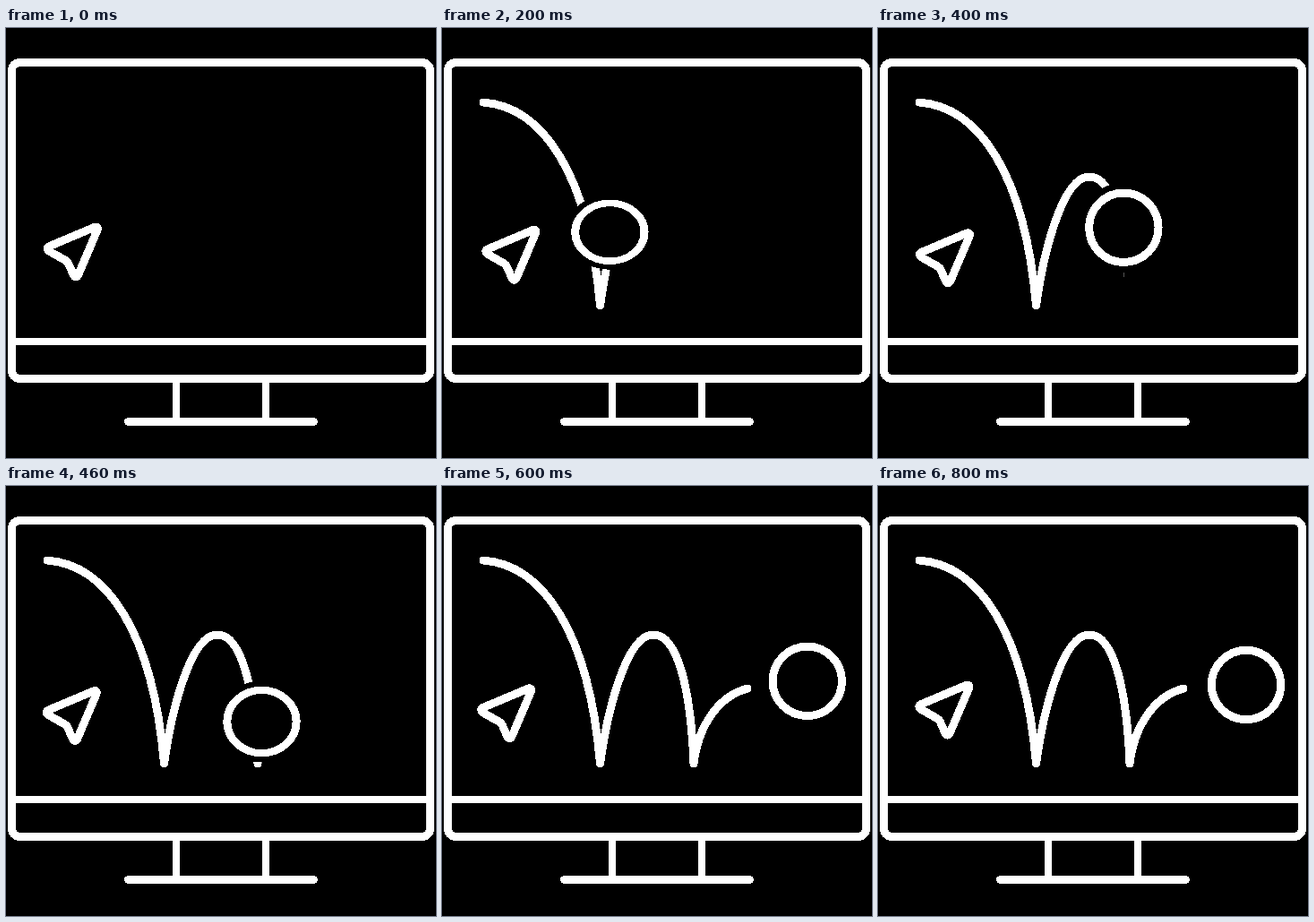
An HTML page for the animation above (820 ms loop, 480 by 480 pixels).

```html
<!DOCTYPE html>
<html lang="en">
<head>
<meta charset="utf-8">
<title>Bouncing ball on a monitor</title>
<style>
  html, body { margin: 0; width: 100%; height: 100%; overflow: hidden; background: #000; }
  svg { display: block; width: 100vw; height: 100vh; shape-rendering: crispEdges; }
  .line { fill: none; stroke: #fff; stroke-width: 9; stroke-linecap: round; stroke-linejoin: round; }
  .thin { stroke-width: 8; }
</style>
</head>
<body>
<svg viewBox="0 0 480 480">
  <clipPath id="behind"><rect id="passed" width="0" height="480"/></clipPath>
  <g id="action">
    <g clip-path="url(#behind)">
      <path class="line" d="M46 83C112 88 164 162 176.5 310C184 255 205 166 236 166C265 166 278 235 281 310C286 268 308 235 341 226"/>
    </g>
    <g id="ball">
      <circle r="50"/>
      <circle class="line" r="38.7"/>
    </g>
  </g>
  <path id="cursor" class="line" d="M48 243.8L98.5 222.5Q103.5 221 101.8 226L80.5 276Q78 280 75.5 276L70 263.5Q69 261 66.5 259.5L48 249Q44.5 246 48 243.8Z"/>
  <g class="line">
    <rect x="6.5" y="38.5" width="467" height="353" rx="9"/>
    <path class="thin" d="M7 350H473M190 392V439M290 392V439"/>
    <path d="M136.5 439.5H343.5"/>
  </g>
</svg>
<script>
const LOOP = 820, STEP = 20;

// Each hop is a Bezier curve run through at an even pace.
const HOPS = [
  { from: 12, to: 157, x: [46, 98, 162, 176], y: [83, 85, 161, 283] },
  { from: 157, to: 447, x: [176, 192, 280, 281], y: [283, 137, 140, 280] },
  { from: 447, to: 640, x: [281, 295, 436, 411], y: [280, 188, 219, 222] }
];

const $ = id => document.getElementById(id);
const [action, passed, ball, cursor] = ['action', 'passed', 'ball', 'cursor'].map($);
const clamp = v => Math.min(1, Math.max(0, v));

function bezier([a, b, c, d], u) {
  const v = 1 - u;
  return a * v ** 3 + 3 * b * v * v * u + 3 * c * v * u * u + d * u ** 3;
}

// Flattening around a landing, gone again 70 ms later.
const squash = (t, landing) => .2 * Math.sin(Math.PI * clamp((t - landing + 20) / 90));

function drawBall(t) {
  const hop = HOPS.find(h => t < h.to) || HOPS[HOPS.length - 1];
  const u = clamp((t - hop.from) / (hop.to - hop.from));
  const x = bezier(hop.x, u), y = bezier(hop.y, u);
  const flat = 1 - squash(t, HOPS[0].to) - squash(t, HOPS[1].to) / 2;

  ball.setAttribute('transform', `translate(${x} ${y}) scale(1 ${flat})`);
  passed.setAttribute('width', x);
}

function drawCursor(t) {
  const a = 2 * Math.PI * t / LOOP;
  cursor.setAttribute('transform', `translate(${2.6 * Math.sin(a)} ${3.35 * (1 - Math.cos(a))})`);
}

function draw(now) {
  const t = Math.floor(now % LOOP / STEP) * STEP;
  action.style.display = t < STEP ? 'none' : '';
  drawBall(t);
  drawCursor(t);
}

const start = performance.now();
function tick() {
  draw(performance.now() - start);
  requestAnimationFrame(tick);
}
tick();
</script>
</body>
</html>
```
